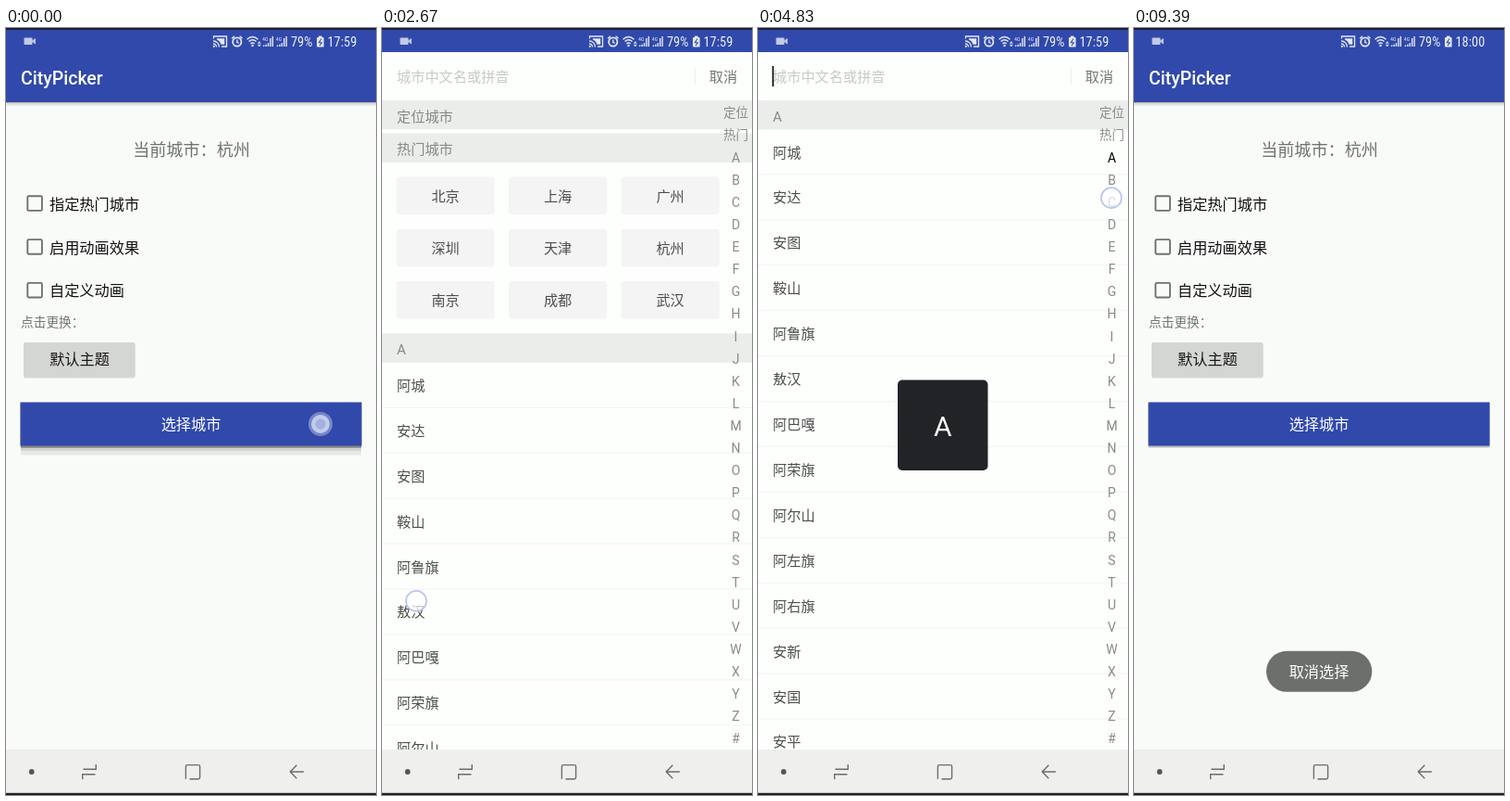
Recreate the animation shown at these times as an HTML page. Size 400 px wide and 827 px high, loop 9.42 s.

```html
<!DOCTYPE html>
<html lang="zh-CN">
<head>
<meta charset="utf-8">
<title>CityPicker</title>
<style>
html, body { margin: 0; width: 100%; height: 100%; overflow: hidden; background: #f9fbf8; }
svg { display: block; width: 400px; height: 827px; }
text { font-family: Roboto, "Noto Sans CJK SC", "Noto Sans CJK", sans-serif; white-space: pre; }
.mid { font-family: "Noto Sans CJK TC", "Noto Sans CJK", sans-serif; }
.status { font-family: "Roboto Condensed", Roboto, sans-serif; font-stretch: condensed; }
</style>
</head>
<body>
<svg id="stage" viewBox="0 0 400 827"></svg>
<script>
const LOOP = 9420, ROW = 48.92, HEAD = 31.3, TOP = 78;
const HOT_TOP = 175.7, A_TOP = 391.5, A_SCROLL = A_TOP - TOP;
const BLUE = '#3049ab', PAPER = '#fdfffd';
const stage = document.getElementById('stage');

function el(tag, attrs, parent, content) {
  const node = document.createElementNS('http://www.w3.org/2000/svg', tag);
  for (const k in attrs) node.setAttribute(k, attrs[k]);
  if (content !== undefined) node.textContent = content;
  (parent || stage).appendChild(node);
  return node;
}
const group = (parent, attrs) => el('g', attrs || {}, parent);
const rect = (p, x, y, width, height, fill, rx = 0, more) =>
  el('rect', { x, y, width, height, fill, rx, ...more }, p);
const circle = (p, cx, cy, r, fill, more) => el('circle', { cx, cy, r, fill, ...more }, p);
const line = (p, d, stroke, width = 1, more) =>
  el('path', { d, stroke, fill: 'none', 'stroke-width': width, ...more }, p);
// Text placed by the vertical middle of its glyphs
const label = (p, x, cy, size, fill, content, anchor = 'start', more) =>
  el('text', { x, y: cy + size * 0.37, 'font-size': size, fill, 'text-anchor': anchor, ...more }, p, content);
const show = (node, on) => node.setAttribute('opacity', +on);
const ramp = (t, a, b) => Math.min(1, Math.max(0, (t - a) / (b - a)));
const move = (node, x, y) => node.setAttribute('transform', `translate(${x} ${y})`);

// Interpolates rows of [time, ...values]
function track(keys, t) {
  if (t <= keys[0][0]) return keys[0].slice(1);
  for (let i = 1; i < keys.length; i++) {
    const a = keys[i - 1], b = keys[i];
    if (t <= b[0]) {
      const k = (t - a[0]) / (b[0] - a[0]);
      return a.slice(1).map((v, j) => v + (b[j + 1] - v) * k);
    }
  }
  return keys[keys.length - 1].slice(1);
}

const CITIES = {
  A: '阿城 安达 安图 鞍山 阿鲁旗 敖汉 阿巴嘎 阿荣旗 阿尔山 阿左旗 阿右旗 安新 安国 安平',
  B: '北京 宝山 宝坻 北辰 北碚 巴南 璧山 巴彦 宾县 拜泉 北安 勃利 宝清 白城',
  C: '昌平 朝阳 崇明 重庆 长寿 城口 长春 长岭 长白 昌图 赤峰 陈旗 承德 沧州',
  D: '大兴 东丽 大足 垫江 大庆 杜蒙 东宁 大兴安岭 德惠 敦化 东丰 东辽 大安 大连',
  E: '二连浩特 鄂托克 额尔古纳 鄂伦春旗 额济纳 鄂州 恩施 恩平 峨眉山 峨边 洱源 峨山 额敏 鄂温克旗',
  F: '房山 丰台 奉贤 涪陵 丰都 奉节 方正 富裕 富锦 抚远 抚松 扶余 抚顺 法库',
  G: '甘南 公主岭 盖州 固阳 根河 高邑 藁城 高阳 高碑店 固安 广宗 馆陶 广平 古交',
  H: '海淀 怀柔 汉沽 和平 合川 哈尔滨 呼兰 海伦 呼玛 黑河 桦川 桦南 虎林 鹤岗',
  J: '嘉定 金山 津南 静海 蓟县 江津 江北 佳木斯 嘉荫 鸡西 鸡东 九台 蛟河 集安',
  K: '开县 克山 克东 康平 宽甸 喀左 开原 开鲁 库伦 康保 宽城 昆山 垦利 开封',
  L: '梁平 龙江 林甸 兰西 林口 萝北 龙井 梨树 柳河 临江 辽源 辽中 辽阳 凌源',
  M: '密云 门头沟 闵行 穆棱 牡丹江 明水 漠河 密山 梅河口 满洲里 满城 孟村 孟县 马鞍山',
  N: '宁河 南开 南川 讷河 宁安 嫩江 农安 南票 奈曼 宁城 南皮 南和 南宫 内丘',
  P: '平谷 浦东 彭水 磐石 普兰店 盘锦 盘山 平山 平泉 平乡 平定 平遥 平顺 平陆',
  Q: '青浦 黔江 綦江 齐齐哈尔 青冈 庆安 七台河 乾安 前郭 清原 清水河 青龙山 曲阳 清苑'
};
const INDEX = ['定位', '热门', ...'ABCDEFGHIJKLMNOPQRSTUVWXYZ#'];
const indexY = i => 91.4 + 24.1 * i;

// ---- Main screen
const main = group();
rect(main, 0, 0, 400, 827, '#f9fbf8');
[[80, 1.2, 0.25], [81.2, 1.4, 0.12], [82.6, 1.6, 0.05]].forEach(([y, h, o]) =>
  rect(main, 0, y, 400, h, '#000', 0, { opacity: o }));
rect(main, 0, 0, 400, 80, BLUE);
label(main, 16, 53.5, 19.5, '#fff', 'CityPicker', 'start', { 'font-weight': 500 });

function withColon(node, before, after) {
  el('tspan', {}, node, before);
  el('tspan', { class: 'mid' }, node, '：');
  el('tspan', {}, node, after);
}
withColon(label(main, 200.5, 131, 18.1, '#70726f', undefined, 'middle'), '当前城市', '杭州');
['指定热门城市', '启用动画效果', '自定义动画'].forEach((s, i) => {
  const y = 189 + 46.8 * i;
  rect(main, 23.3, y - 7.7, 15.6, 15.6, 'none', 1.2, { stroke: '#70726f', 'stroke-width': 1.9 });
  label(main, 47, y + 0.8, 16.2, '#111', s);
});
withColon(label(main, 16, 316.5, 13.7, '#737572'), '点击更换', '');

rect(main, 19, 340.2, 120.5, 37.2, '#000', 2, { opacity: 0.13 });
rect(main, 19, 339, 120.5, 37, '#d4d6d3', 2);
label(main, 79.5, 357.5, 16.2, '#181818', '默认主题', 'middle');

const lift = group(main);
[[450, 3, 0.3], [453, 3, 0.16], [456, 4.5, 0.07]].forEach(([y, h, o]) =>
  rect(lift, 16, y, 368, h, '#000', 0, { opacity: o }));
rect(main, 15.5, 404, 369, 48.5, '#000', 1, { opacity: 0.25 });
rect(main, 15.5, 403.5, 369, 47, BLUE);
label(main, 200, 427.5, 16.2, '#fff', '选择城市', 'middle');

const toast = group(main);
rect(toast, 143, 671.8, 114.3, 44, '#6c6f6c', 22);
label(toast, 200, 694.3, 16.2, '#fff', '取消选择', 'middle');

// ---- City picker
const picker = group();
rect(picker, 0, 26, 400, 752, PAPER);

function header(parent, name) {
  const g = group(parent);
  rect(g, 0, 0, 400, HEAD, '#ebedea');
  g.name = label(g, 16, 17, 15.2, '#878986', name);
  return g;
}
function cityButton(parent, col, y, name) {
  const x = 15.4 + 121.5 * col;
  rect(parent, x, y, 106.3, 40.6, '#f3f4f3', 4);
  label(parent, x + 53.2, y + 20.8, 15.2, '#4d4f4d', name, 'middle');
}

const top0 = group(picker);
move(header(top0, '定位城市'), 0, TOP);
cityButton(top0, 0, 119, '深圳');
move(header(top0, '热门城市'), 0, HOT_TOP);
'北京 上海 广州 深圳 天津 杭州 南京 成都 武汉'.split(' ').forEach((s, i) =>
  cityButton(top0, i % 3, 222.6 + 56.3 * Math.floor(i / 3), s));

const list = group(picker);
const listHead = header(list, 'A');
const pressed = group(list);
const pressTop = HEAD + 5 * ROW;
rect(pressed, 0, pressTop, 400, ROW, '#f2f3f2');
const clip = el('clipPath', { id: 'row' }, list);
rect(clip, 0, pressTop, 400, ROW, '#000');
const ripple = circle(group(pressed, { 'clip-path': 'url(#row)' }), 88, pressTop + 24, 43, '#e9eae9');
const rows = [];
for (let i = 0; i < 14; i++) {
  const y = HEAD + i * ROW;
  rows.push(label(list, 16, y + 24.6, 15.2, '#4d4f4d', ''));
  rect(list, 0, y + ROW - 0.8, 400, 1, '#f1f3f0');
}
const pinned = header(picker, '');

rect(picker, 0, 26, 400, 52, PAPER);
label(picker, 16, 52.5, 15.2, '#c8cac7', '城市中文名或拼音');
rect(picker, 338, 44, 1, 16, '#eceeeb');
label(picker, 369, 52.5, 15.2, '#747673', '取消', 'middle');
const caret = rect(picker, 15.3, 41, 1.9, 22, '#222');

const letters = INDEX.map((s, i) =>
  label(picker, 382.5, indexY(i), i < 2 ? 13.5 : 14, '#898b88', s, 'middle'));
const overlay = group(picker);
rect(overlay, 151, 379.5, 97.5, 97.5, '#222327', 5);
const bigLetter = label(overlay, 199.7, 428.8, 30, '#fff', '', 'middle');

// ---- System bars
const bars = group();
rect(bars, 0, 0, 400, 26, BLUE);
rect(bars, 0, 0, 400, 2, '#1c2030');
const ICON = '#e4e8f6';
rect(bars, 19.5, 10.5, 9, 7.5, '#c3cae6', 1);
line(bars, 'M28 14.2 L31.5 11.5 V17 Z', '#c3cae6', 0.8, { fill: '#c3cae6' });
// cast
line(bars, 'M224.5 11.5 V9 H238.5 V20 H233', ICON, 1.3);
line(bars, 'M224 14 A6.5 6.5 0 0 1 230.5 20.5 M224 17 A3.5 3.5 0 0 1 227.5 20.5', ICON, 1.3);
line(bars, 'M228 11.5 H236 V17.5 H232.5 Q231.5 13.5 228 12.5 Z', ICON, 0.4, { fill: ICON });
circle(bars, 224.8, 19.8, 1.1, ICON);
// alarm
circle(bars, 249.8, 15, 4.6, 'none', { stroke: ICON, 'stroke-width': 1.8 });
line(bars, 'M249.8 12.5 V15.3 L251.7 16.5 M244 11.3 L247 8.9 M255.6 11.3 L252.6 8.9', ICON, 1.4);
// wifi
line(bars, 'M260.5 12.3 Q266.5 6.8 272.5 12.3 M262.5 14.6 Q266.5 11 270.5 14.6 M264.4 16.9 Q266.5 15.2 268.6 16.9', ICON, 1.4);
circle(bars, 266.5, 19, 1.2, ICON);
line(bars, 'M272 16.5 L273.8 14.5 L275.6 16.5 Z M272 18 L273.8 20 L275.6 18 Z', ICON, 0.3, { fill: ICON });
// signal bars
[277, 291.8].forEach(x => {
  label(bars, x, 11.3, 6, ICON, '4G', 'start', { class: 'status' });
  [2.5, 4, 6.5, 9, 11].forEach((h, i) =>
    rect(bars, x + 1 + 2.4 * i, 20 - h * (i < 3 ? 0.6 : 1), 1.4, h * (i < 3 ? 0.6 : 1), ICON));
});
const status = { class: 'status' };
label(bars, 308, 15, 14.4, '#eef0fa', '79%', 'start', status);
rect(bars, 336, 10, 7.6, 10.5, ICON, 1);
rect(bars, 338, 8.6, 3.6, 2, ICON);
line(bars, 'M340.8 11.8 L338.3 15.8 H341.4 L339 19', BLUE, 1.1);
const clock = label(bars, 379.3, 15, 14.4, '#eef0fa', '', 'end', status);

rect(bars, 0, 778, 400, 47, '#eff0ee');
rect(bars, 0, 824.8, 400, 2.2, '#1d1f29');
const NAV = '#6b6d6b';
circle(bars, 27.7, 802, 2.9, '#565856');
line(bars, 'M83.5 799.2 H97.3 V794 M82.7 810 V804.8 H96.5', NAV, 1.4);
line(bars, 'M198.5 809.7 H208 Q209.6 809.7 209.6 808 V796.2 Q209.6 794.6 208 794.6 H196 Q194.4 794.6 194.4 796.2 V809.7', NAV, 1.4);
line(bars, 'M314.3 794.8 L307.3 802 L314.3 809.3 M307.3 802 H321.8', NAV, 1.4);

// ---- Finger
const finger = group();
const soft = group(finger);
circle(soft, 0, 0, 11, '#fff', { 'fill-opacity': 0.68, stroke: '#bcc5ec', 'stroke-width': 1.7 });
const strong = group(finger);
circle(strong, 0, 0, 13, '#7686cb');
circle(strong, 0, 0, 10, '#c3cbea');
circle(strong, 0, 0, 5.5, '#a3b0e0');

const DRAG = [[4600, 382, 139], [4720, 382, 143], [4830, 382, 183], [7000, 376, 522], [7230, 374, 537], [7500, 374, 536.5]];
const TOUCHES = [
  [[0, 340, 427], [160, 340, 427]],
  [[1600, 57, 688], [1740, 57, 688], [1920, 55, 681], [2670, 37, 618], [3930, 23, 473], [4200, 21, 445]],
  DRAG,
  [[8330, 370, 53], [8460, 370, 53]]
];
const SCROLL = [[1900, 0], [2670, 62], [3930, 211], [4200, 240]];
const DRAG_IN = 4640, DRAG_OUT = 7560, LAG = 110;

let section = '';
function setSection(letter) {
  if (letter === section || !CITIES[letter]) return;
  section = letter;
  const names = CITIES[letter].split(' ');
  rows.forEach((r, i) => r.textContent = names[i] || '');
  listHead.name.textContent = letter;
}

function drawList(t) {
  const scroll = t < DRAG_IN ? track(SCROLL, t)[0] : A_SCROLL;
  const dragY = track(DRAG, t - LAG)[1];
  const current = t < DRAG_IN ? 2 : Math.round((dragY - indexY(0)) / 24.1);
  const dragging = t >= DRAG_IN && t < DRAG_OUT;

  if (INDEX[current] === 'I') setSection('H');
  else if (INDEX[current] === 'O') setSection('N');
  else setSection(INDEX[current]);
  move(top0, 0, -scroll);
  move(list, 0, A_TOP - scroll);

  // The next section header pushes the pinned one upward
  const hotY = HOT_TOP - scroll, aY = A_TOP - scroll;
  const [name, next] = aY <= TOP ? [section, 999] : hotY <= TOP ? ['热门城市', aY] : ['定位城市', hotY];
  pinned.name.textContent = name;
  move(pinned, 0, Math.min(TOP, next - HEAD));

  letters.forEach((n, i) => n.setAttribute('fill', dragging && i === current ? '#000' : '#898b88'));
  show(overlay, dragging);
  bigLetter.textContent = INDEX[current];

  pressed.setAttribute('opacity', ramp(t, 1660, 1710) * (1 - ramp(t, 1900, 2020)));
  const grow = ramp(t, 1660, 1900);
  ripple.setAttribute('r', 15 + 84 * grow);
  ripple.setAttribute('cx', 57 + 93 * grow);
  show(caret, (t + 170) % 600 < 300);
}

function draw(t) {
  const shown = ramp(t, 260, 400) * (1 - ramp(t, 8470, 8590));
  const size = t < 1000 ? 0.9 + 0.1 * shown : 1;
  picker.setAttribute('opacity', shown);
  picker.setAttribute('transform', `translate(200 413) scale(${size}) translate(-200 -413)`);
  drawList(t);

  lift.setAttribute('opacity', 1 - ramp(t, 140, 260));
  toast.setAttribute('opacity', ramp(t, 8560, 8740));
  clock.textContent = t < 8000 ? '17:59' : '18:00';

  const touch = TOUCHES.find(k => t >= k[0][0] && t <= k[k.length - 1][0]);
  show(finger, !!touch);
  if (touch) {
    move(finger, ...track(touch, t));
    show(strong, touch === TOUCHES[0]);
    show(soft, touch !== TOUCHES[0]);
  }
}

function tick() {
  draw(performance.now() % LOOP);
  requestAnimationFrame(tick);
}
tick();
</script>
</body>
</html>
```
